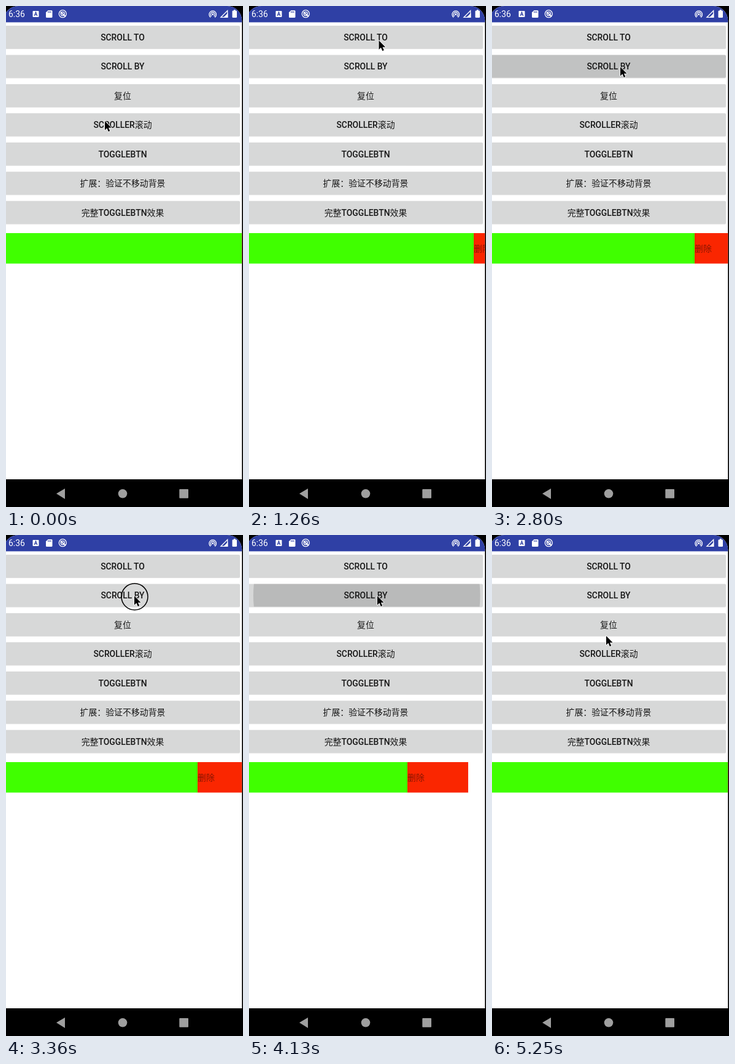
Write an HTML page that moves like this. It is 386 by 814 pixels and loops after 5.32 s.

```html
<!DOCTYPE html>
<html lang="zh-CN">
<head>
<meta charset="utf-8">
<title>Scroll demo</title>
<style>
  html, body { margin: 0; width: 100%; height: 100%; overflow: hidden; background: #000; }
  svg { display: block; width: 100%; height: 100%; }
  text { font: 400 13.9px Roboto, "Noto Sans CJK SC", "Noto Sans CJK", sans-serif; }
  .label { text-anchor: middle; fill: #161616; }
  .latin { font-weight: 500; }
</style>
</head>
<body>
<svg viewBox="0 0 386 814">
  <defs>
    <clipPath id="screen"><rect x="-4" width="388.3" height="830" rx="24"/></clipPath>
  </defs>
  <rect width="386" height="814"/>
  <g clip-path="url(#screen)">
    <rect width="386" height="769" fill="#fff"/>
    <rect width="386" height="26.5" fill="#2f40a5"/>

    <g fill="#fff">
      <text x="4" y="18">6:36</text>
      <rect x="43.5" y="8" width="10" height="10" rx="1"/>
      <path d="M46.2 16 48.5 10 50.8 16M47 14.2h3" fill="none" stroke="#2f40a5" stroke-width="1.2"/>
      <path d="M68.5 7H74q1.5 0 1.5 1.5v9Q75.500 19 74 19H66.500Q65 19 65 17.500V10.500Z"/>
      <path d="M68.800 8.500v2.500M70.800 8.500v2.500M72.800 8.500v2.500" stroke="#2f40a5"/>
      <path d="M369.800 7.500h1.200V6h2.500v1.500h1.200q1.300 0 1.300 1.300v9q0 1.200-1.300 1.200h-4.900q-1.300 0-1.300-1.200v-9q0-1.300 1.300-1.300Z"/>
      <circle cx="336.700" cy="13.500" r="1.600"/>
    </g>
    <g fill="none" stroke="#fff" stroke-width="1.300">
      <circle cx="92.300" cy="12.700" r="6"/>
      <circle cx="92.300" cy="12.700" r="3"/>
      <path d="M89 10 97 17" stroke-width="1.800"/>
      <path d="M334.700 16.600a3.500 3.500 0 1 1 4 0M333.300 18.400a5.800 5.800 0 1 1 6.800 0"/>
      <path d="M350 18.300 360.700 7.600V18.300Z"/>
      <path d="M355.500 18.300 360.700 13V18.300Z" fill="#fff"/>
    </g>

    <g id="buttons"></g>

    <g id="row">
      <rect x="-4" y="369" width="388" height="49.500" fill="#40ff00"/>
      <rect x="384" y="369" width="99" height="49.500" fill="#fa2600"/>
      <text x="384" y="399" fill="#000" fill-opacity=".45">删除</text>
    </g>

    <rect y="769" width="386" height="45"/>
    <g fill="#9f9f9f">
      <path d="M82 792.300 96 784V801Z"/>
      <circle cx="190" cy="792.300" r="7.300"/>
      <rect x="282.300" y="785" width="14.700" height="14.700" rx="1"/>
    </g>
  </g>

  <g id="cursor">
    <circle id="ring" cx=".5" cy="1.300" r="21.500" fill="none" stroke="#000" stroke-width="1.500"/>
    <path d="M0 0V14.800L3.400 11.600 5.800 17 8.300 15.900 5.900 10.700H10.600Z"
          stroke="#fff" stroke-width="1.600" paint-order="stroke" stroke-linejoin="round"/>
  </g>
</svg>

<script>
const LOOP = 5320, STEP = 70;
const LEFT = -1, WIDTH = 382, HEIGHT = 37, PITCH = 47.45, TOP = 32;
const SCROLL_STEP = 18;
const labels = ['SCROLL TO', 'SCROLL BY', '复位', 'SCROLLER滚动', 'TOGGLEBTN',
                '扩展：验证不移动背景', '完整TOGGLEBTN效果'];

// Start of each press; every one scrolls the row, the last resets it.
const clicks = [
  { at: 755, button: 0, x: 212, y: 48 },
  ...[2015, 2535, 2940, 3345, 3745, 3985, 4215].map(at => ({ at, button: 1, x: 209, y: 99 })),
  { at: 4815, button: 2, x: 190, y: 148 }
];

// Cursor stops: time, x, y
const path = [
  [0, 161, 187], [490, 212, 48], [1190, 212, 48], [1470, 209, 99],
  [4550, 209, 99], [4690, 190, 148], [5180, 190, 148], [5250, 186, 164], [LOOP, 186, 164]
];

const byId = id => document.getElementById(id);
const clamp = v => Math.min(1, Math.max(0, v));
const mix = (a, b, k) => a + (b - a) * k;
const smooth = k => k * k * (3 - 2 * k);
const buttonTop = i => TOP + i * PITCH;

// cubic-bezier(.4, 0, .2, 1)
function fastOutSlowIn(x) {
  let low = 0, high = 1;
  for (let i = 0; i < 20; i++) {
    const s = (low + high) / 2, r = 1 - s;
    if (1.2 * r * r * s + 0.6 * r * s * s + s ** 3 < x) low = s; else high = s;
  }
  return low * low * (3 - 2 * low);
}

byId('buttons').innerHTML = labels.map((label, i) => {
  const y = buttonTop(i);
  const box = (dy, rest) =>
    `<rect x="${LEFT}" y="${y + dy}" width="${WIDTH}" height="${HEIGHT}" rx="2" ${rest}/>`;
  const ripples = clicks.map((c, n) => c.button === i ? `<circle id="ripple${n}"/>` : '').join('');
  const text = label.replace(/[A-Z ]+/g, '<tspan class="latin">$&</tspan>');
  return `<clipPath id="clip${i}">${box(0, '')}</clipPath>
    ${box(1, 'fill="#000" fill-opacity=".13"')}${box(0, 'fill="#d7d8d8"')}
    <g clip-path="url(#clip${i})">${ripples}</g>
    <text class="label" x="190" y="${y + 24}">${text}</text>`;
}).join('');

function drawRipple(click, n, t) {
  const age = t - click.at;
  const k = fastOutSlowIn(clamp(age / 225));
  const alpha = 0.14 * clamp((age - 17) / 60) * (1 - clamp((age - 225) / 150));
  const set = (name, value) => byId('ripple' + n).setAttribute(name, value);
  set('cx', mix(click.x, LEFT + WIDTH / 2, k));
  set('cy', mix(click.y, buttonTop(click.button) + HEIGHT / 2, k));
  set('r', mix(WIDTH * 0.3, Math.hypot(WIDTH, HEIGHT) / 2, k));
  set('fill-opacity', alpha);
}

function draw(t) {
  clicks.forEach((click, n) => drawRipple(click, n, t));

  const done = clicks.filter(c => t >= c.at + 70).length;
  const scroll = done === clicks.length ? 0 : done * SCROLL_STEP;
  byId('row').setAttribute('transform', `translate(${-scroll})`);

  const next = path.findIndex(p => p[0] > t);
  const [t0, x0, y0] = path[next - 1], [t1, x1, y1] = path[next];
  const k = smooth((t - t0) / (t1 - t0));
  byId('cursor').setAttribute('transform', `translate(${mix(x0, x1, k)} ${mix(y0, y1, k)})`);

  const pressed = clicks.some(c => t >= c.at - 55 && t < c.at + 85);
  byId('ring').setAttribute('visibility', pressed ? 'visible' : 'hidden');
}

const start = performance.now();
function tick() {
  const t = (performance.now() - start) % LOOP;
  draw(Math.floor(t / STEP) * STEP);
  requestAnimationFrame(tick);
}
tick();
</script>
</body>
</html>
```
